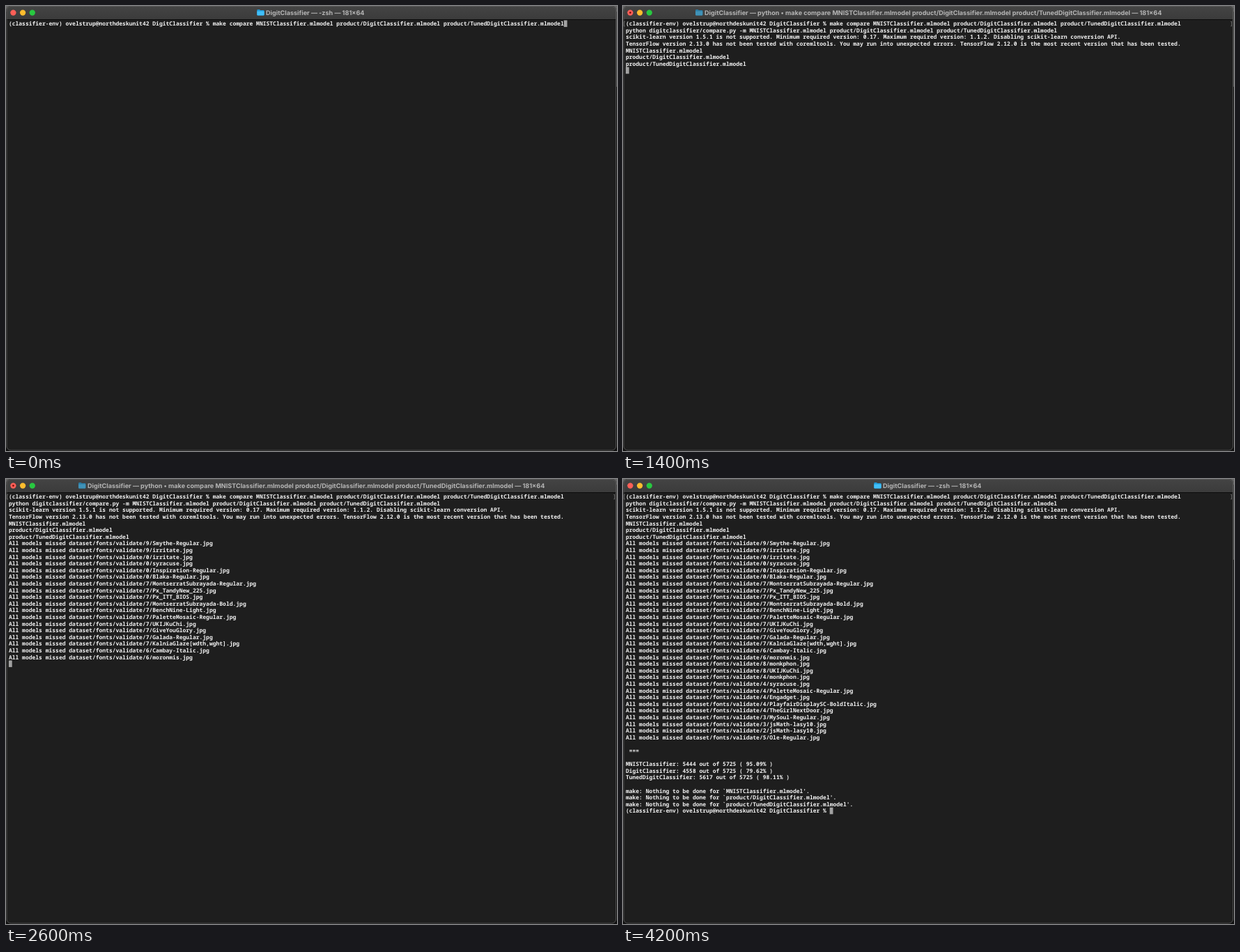
Write an HTML page that moves like this. It is 877 by 639 pixels and loops after 5100 ms.

```html
<!DOCTYPE html>
<html lang="en">
<head>
<meta charset="utf-8">
<title>Terminal</title>
<style>
  html, body { margin: 0; width: 100%; height: 100%; overflow: hidden; background: #101010; }
  svg { display: block; width: 100%; height: 100%; }
  text { white-space: pre; text-rendering: geometricPrecision; }
  #screen { font: 600 8px "Noto Sans Mono", "DejaVu Sans Mono", monospace; fill: #f2f2f2;
            font-variant-ligatures: none; }
  #marks { fill: #858585; font-weight: 400; }
  #title { font: 700 9.07px Inter, "Open Sans", sans-serif; fill: #b5b5b5; }
</style>
</head>
<body>
<svg viewBox="0 0 877 639">
  <defs>
    <linearGradient id="bar" x2="0" y2="1">
      <stop stop-color="#444"/><stop offset="1" stop-color="#3b3b3b"/>
    </linearGradient>
    <clipPath id="frame"><rect x=".5" width="875.5" height="638" rx="6"/></clipPath>
  </defs>
  <rect width="877" height="8" fill="#666"/>
  <rect x="876" y="8" width="1" height="108" fill="#484848"/>
  <g clip-path="url(#frame)">
    <rect width="877" height="639" fill="#1e1e1e"/>
    <rect width="877" height="19" fill="url(#bar)"/>
    <rect y="19" width="877" height="1" fill="#0c0c0c"/>
  </g>
  <rect x="1" y=".5" width="874.5" height="637.5" rx="6" fill="none" stroke="#5c5c5c" stroke-width=".8"/>
  <circle cx="10.4" cy="9.6" r="4.15" fill="#fe5f57"/>
  <circle id="busy" cx="10.4" cy="9.6" r="1.4" fill="#7a0c08"/>
  <circle cx="24.1" cy="9.6" r="4.15" fill="#febc2e"/>
  <circle cx="37.8" cy="9.6" r="4.15" fill="#28c840"/>
  <g id="folder">
    <path d="M0 1.2Q0 0 1.2 0H3.6L4.8 1H9.2Q10.3 1 10.3 2.2V7.4Q10.3 8.5 9.2 8.5H1.2Q0 8.5 0 7.4Z" fill="#1f9ad8"/>
    <path d="M0 2.6H10.3V7.4Q10.3 8.5 9.2 8.5H1.2Q0 8.5 0 7.4Z" fill="#41bff8"/>
  </g>
  <text id="title" y="12.6"></text>
  <g id="screen">
    <g id="marks"><text x="-.8" y="28.1">[</text><text x="871" y="28.1">]</text></g>
    <g id="rows"></g>
  </g>
  <rect id="cursor" width="4.8" height="9.6" fill="#a2a2a2"/>
</svg>
<script>
const LOOP = 5100, LEFT = 3.9, TOP = 20.5, CELL_W = 4.8, CELL_H = 9.6, BASELINE = 7.6;
const $ = id => document.getElementById(id);

const prompt = "(classifier-env) ovelstrup@northdeskunit42 DigitClassifier % ";
const models = ["MNISTClassifier.mlmodel", "product/DigitClassifier.mlmodel", "product/TunedDigitClassifier.mlmodel"];
const command = "make compare " + models.join(" ");
const missed = `9/Smythe-Regular 9/irritate 0/irritate 0/syracuse 0/Inspiration-Regular 0/Blaka-Regular
  7/MontserratSubrayada-Regular 7/Px_TandyNew_225 7/Px_ITT_BIOS 7/MontserratSubrayada-Bold
  7/BenchNine-Light 7/PaletteMosaic-Regular 7/UKIJKuChi 7/GiveYouGlory 7/Galada-Regular
  7/KalniaGlaze[wdth,wght] 6/Cambay-Italic 6/moronmis 8/monkphon 8/UKIJKuChi 4/monkphon
  4/syracuse 4/PaletteMosaic-Regular 4/Engadget 4/PlayfairDisplaySC-BoldItalic
  4/TheGirlNextDoor 3/MySoul-Regular 3/jsMath-lasy10 2/jsMath-lasy10 5/Ole-Regular`.split(/\s+/);

const lines = [
  prompt + command,
  "python digitclassifier/compare.py -m " + models.join(" "),
  "scikit-learn version 1.5.1 is not supported. Minimum required version: 0.17. Maximum required version: 1.1.2. Disabling scikit-learn conversion API.",
  "TensorFlow version 2.13.0 has not been tested with coremltools. You may run into unexpected errors. TensorFlow 2.12.0 is the most recent version that has been tested.",
  ...models,
  ...missed.map(name => `All models missed dataset/fonts/validate/${name}.jpg`),
  "", " ===", "",
  "MNISTClassifier: 5444 out of 5725 ( 95.09% )",
  "DigitClassifier: 4558 out of 5725 ( 79.62% )",
  "TunedDigitClassifier: 5617 out of 5725 ( 98.11% )",
  "",
  ...models.map(name => `make: Nothing to be done for \`${name}'.`),
  prompt
];

const titles = {
  idle: { icon: 360.3, x: 373, text: "DigitClassifier — -zsh — 181×64" },
  busy: { icon: 104, x: 117, text: `DigitClassifier — python • ${command} — 181×64` }
};

// [start in ms, number of finished lines]
const steps = [
  [0, 0], [100, 2], [500, 3], [1000, 4], [1100, 5], [1200, 6], [1400, 7],
  [1700, 8], [1800, 9], [2000, 12], [2100, 15], [2200, 18], [2300, 22], [2400, 24],
  [2600, 25], [2900, 26], [3000, 27], [3100, 28], [3200, 31], [3300, 33],
  [3500, 35], [3800, 36], [4000, 37], [4100, 47]
];

const rows = lines.map((line, i) => {
  const row = document.createElementNS("http://www.w3.org/2000/svg", "text");
  row.setAttribute("x", LEFT);
  row.setAttribute("y", TOP + BASELINE + i * CELL_H);
  row.textContent = line;
  return $("rows").appendChild(row);
});

const show = (el, on) => { el.style.visibility = on ? "visible" : "hidden"; };

function showTitle(busy) {
  const { icon, x, text } = busy ? titles.busy : titles.idle;
  $("title").textContent = text;
  $("title").setAttribute("x", x);
  $("folder").setAttribute("transform", `translate(${icon} 5)`);
  $("folder").setAttribute("opacity", busy ? .65 : 1);
  show($("busy"), busy);
}

function showScreen(done) {
  const atPrompt = done === 0 || done === lines.length - 1;
  const column = atPrompt ? lines[done].length : 0;
  rows.forEach((row, i) => show(row, i < done || (atPrompt && i === done)));
  show($("marks"), done > 0);
  $("cursor").setAttribute("x", LEFT + column * CELL_W);
  $("cursor").setAttribute("y", TOP + done * CELL_H);
}

let shown = "";
function draw() {
  const t = performance.now() % LOOP;
  const done = steps.findLast(([start]) => t >= start)[1];
  const busy = t >= 200 && t < 4200;
  const state = `${done} ${busy}`;
  if (state !== shown) {
    showTitle(busy);
    showScreen(done);
    shown = state;
  }
  requestAnimationFrame(draw);
}
draw();
</script>
</body>
</html>
```
